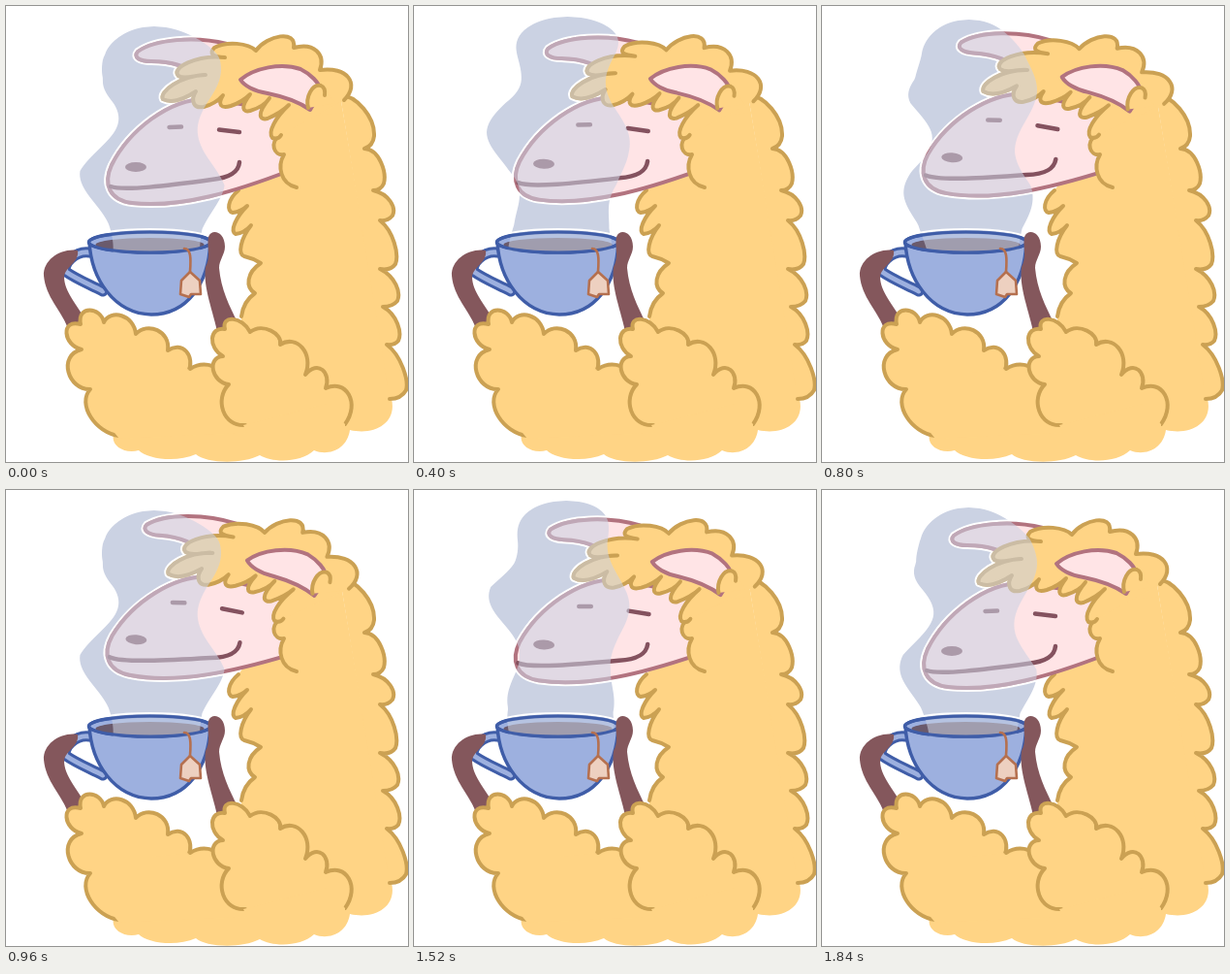
An HTML page that plays this animation: 415 px wide and 470 px high, repeating every 1920 ms.

```html
<!DOCTYPE html>
<html lang="en">
<head>
<meta charset="utf-8">
<title>Alpaca with tea</title>
<style>
  html, body { margin: 0; width: 100%; height: 100%; overflow: hidden; background: #fff; }
  svg { display: block; width: 415px; height: 470px; stroke-linecap: round; stroke-linejoin: round; }
  .wool { fill: #ffd485; stroke: #cba153; stroke-width: 4; }
  .fill { fill: #ffd485; }
  .skin { fill: #ffe4e6; stroke: #b2737f; stroke-width: 4; }
  .dark { stroke: #84525f; stroke-width: 4.5; }
  .paw { fill: #84575c; }
  .china { fill: #9db0df; stroke: #3f5da8; stroke-width: 3.5; }
  .tag { fill: #edd0c0; stroke: #b5704f; stroke-width: 2.6; }
  .halo { fill: #fff; stroke: #fff; stroke-width: 8; }
  .veil { fill: #fff; stroke: #fff; stroke-width: 4; }
  .steam { fill: #cbd2e3; }
  .line { fill: none; }
</style>
</head>
<body>
<svg viewBox="0 0 415 470">
  <defs>
    <path id="farEar" d="M228 39C196 31 154 34 136 47C131 53 138 57 150 57C172 57 186 62 202 74Z"/>
    <path id="face" d="M210 96C168 94 126 130 109 164C100 184 107 200 130 203C180 209 240 190 292 170L300 110Z"/>
    <path id="hair" d="M349 97C366 80 352 62 324 66C330 50 318 37 297 43C300 24 270 30 258 46C250 38 228 36 215 43C209 50 214 52 226 53C196 50 170 64 178 72C186 77 196 70 206 71C180 72 158 88 162 96C172 101 184 96 196 88C190 98 194 106 204 104Q216 101 224 92C218 102 222 106 232 103Q244 99 252 91C242 104 244 110 252 108Q266 104 272 95C258 112 262 118 270 116Q284 110 292 102C278 115 270 130 275 136Q281 138 284 133"/>
    <ellipse id="rim" cx="148.500" cy="243.500" rx="63" ry="10.500"/>
    <path id="handle" d="M86 254C72 252 58 266 62 274C72 281 82 285 100 294"/>
    <path id="right" d="M345 92C362 92 381 115 380 134Q379 144 370 147C386 148 393 172 390 183Q387 190 379 190C396 194 403 208 399 216Q394 222 386 221C400 232 406 256 402 266Q397 273 386 271C402 279 408 295 404 304Q399 310 389 310C404 318 409 337 405 345Q401 350 393 349C408 360 416 386 413 396Q408 405 396 405"/>
    <path id="left" d="M240 190C228 200 228 212 234 213Q243 212 249 206C237 218 231 232 237 235Q246 234 253 226C242 240 239 256 246 258Q255 260 263 265C248 275 247 290 257 296C247 303 244 312 243 320"/>
    <mask id="behind" maskUnits="userSpaceOnUse" x="0" y="0" width="415" height="470">
      <g class="head veil">
        <use href="#farEar"/><use href="#face"/><use href="#hair"/>
      </g>
      <use href="#rim" class="veil"/>
    </mask>
  </defs>

  <path class="steam"/>
  <g class="head halo">
    <use href="#farEar"/><use href="#face"/><use href="#hair"/>
  </g>
  <use href="#rim" class="halo"/>

  <!-- neck and body -->
  <path class="fill" d="M240 190C228 200 228 212 234 213Q243 212 249 206C237 218 231 232 237 235Q246 234 253 226C242 240 239 256 246 258Q255 260 263 265C248 275 247 290 257 296C247 303 244 312 243 320L243 385L100 385L90 420L111 442C108 453 122 462 137 458C146 467 176 471 196 462C206 471 242 473 262 463C275 471 304 471 318 458C332 464 352 458 355 437C380 443 404 430 398 405L345 92L300 95L250 176Z"/>
  <use href="#right" class="wool"/>
  <g class="line"><use href="#left" class="wool" style="fill:none"/></g>

  <g class="head">
    <use href="#farEar" class="skin"/>
    <use href="#face" class="skin"/>
    <path class="dark line" d="M108 186C121 191 168 185 212 179C232 177 240 171 241 161"/>
    <path class="dark line" d="M220 127.500L241 130M168.500 125L181 124.500"/>
    <ellipse cx="134" cy="166" rx="11" ry="5" fill="#84525f"/>
  </g>
  <path class="fill" d="M283 133C272 140 276 155 287 153C280 165 283 183 300 187L345 187L345 110L300 115Z"/>
  <path class="wool" style="fill:none" d="M283 133C272 140 276 155 287 153C280 165 283 183 300 187"/>
  <g class="head">
    <use href="#hair" class="wool"/>
    <path class="skin" d="M314 107C300 97 285 93 270 90C256 88 246 82 242 76C256 64 284 58 304 65C314 70 324 79 325 88Z"/>
    <path class="fill" d="M312 105C309 94 316 83 325 82L340 100Z"/>
    <path class="wool" style="fill:none" d="M312 105C309 94 316 80 325 82Q330 84 329 92"/>
  </g>

  <!-- cup -->
  <g class="line">
    <use href="#handle" stroke="#3f5da8" stroke-width="11"/>
    <use href="#handle" stroke="#9db0df" stroke-width="5"/>
  </g>
  <path class="china" d="M86 243C88 282 112 317 150 318C186 318 209 288 211 243Z"/>
  <use href="#rim" class="china"/>
  <ellipse cx="148.500" cy="246" rx="56" ry="7" fill="#6a5a6c"/>
  <path class="steam" mask="url(#behind)" opacity=".56"/>
  <use href="#rim" class="line" stroke="#3f5da8" stroke-width="3"/>
  <path class="tag line" style="fill:none" d="M184 250C191 250 191 260 190 274"/>
  <path class="tag" d="M190 274L200 283L201 297L191 297L189 300L180 297L181 283Z"/>

  <path class="paw" d="M74 252C58 249 38 261 39 278C41 300 57 314 63 330L82 324C74 308 60 295 60 279C61 269 76 264 74 252Z"/>
  <path class="paw" d="M209 238C212 229 226 232 226 248C226 256 220 262 220 270C222 292 230 308 240 328L219 340C214 314 203 290 206 269C212 258 207 248 209 238Z"/>

  <!-- forearms -->
  <path class="wool" d="M117 443C92 440 73 410 87 395C64 396 53 360 78 354C59 350 56 322 77 328C73 308 98 310 101 326C108 312 132 318 134 338C146 325 170 335 167 355C182 345 196 360 188 378"/>
  <path class="fill" d="M100 425L150 378L190 374Q201 367 216 371L247 400L247 440L117 446Z"/>
  <path class="wool" style="fill:none" d="M190 374Q201 367 213 371"/>
  <path class="wool" d="M247 432C224 434 215 405 230 390C212 388 207 362 224 361C208 352 210 330 226 333C222 318 244 320 252 336C265 326 286 338 283 349C300 338 318 358 309 380C322 364 336 378 330 394C351 384 366 409 350 431"/>
  <path class="fill" d="M245 432L249 440L350 440L350 431L330 410Z"/>
</svg>
<script>
const LOOP = 1920, STEP = 80, TAU = Math.PI * 2, WAVE = 130;
const heads = document.querySelectorAll('.head');
const steams = document.querySelectorAll('.steam');
const tops = [21, 17, 11, 8, 10, 11, 11, 11, 11, 12, 14, 18];

// Edge tables: y, mean x, sway
const leftEdge = [[0, 101, 2], [50, 104, 3], [75, 104, 8], [100, 98, 20], [130, 95, 20],
  [170, 91, 18], [195, 96, 13], [225, 103, 7], [260, 104, 7]];
const rightEdge = [[0, 207, 9], [50, 211, 11], [100, 209, 13], [150, 211, 12], [185, 215, 12],
  [230, 203, 4], [260, 203, 3]];

const ease = u => (1 - Math.cos(Math.PI * u)) / 2;

function edge(table, y, bulge, side) {
  const i = table.findIndex(row => row[0] > y);
  const a = table[i - 1], b = table[i], u = (y - a[0]) / (b[0] - a[0]);
  const mix = k => a[k] + (b[k] - a[k]) * u;
  return mix(1) + side * mix(2) * Math.cos(TAU * (y - bulge) / WAVE);
}

// Bulges climb the column; the top closes in a rounded cap
function steamPath(phase) {
  const top = tops[phase], rise = WAVE * phase / 12, left = [], right = [];
  for (let y = top; y <= 254; y += y < top + 8 ? 1 : 3) {
    const l = edge(leftEdge, y, 183 - rise, -1), r = edge(rightEdge, y, 195 - rise, 1);
    const u = Math.min(1, (y - top) / 36), cap = Math.sqrt(1 - (1 - u) ** 2);
    const mid = (l + r) / 2, half = (r - l) / 2 * cap;
    left.unshift(`${mid - half} ${y}`);
    right.push(`${mid + half} ${y}`);
  }
  return `M${left.concat(right).join('L')}Z`;
}

function draw(now) {
  const frame = Math.floor(now % LOOP / STEP), t = frame * STEP;
  const nod = t < 1200 ? ease(t / 1200) : ease(Math.max(0, 1840 - t) / 640);
  const d = steamPath(frame % 12);
  steams.forEach(s => s.setAttribute('d', d));
  heads.forEach(h => h.setAttribute('transform', `rotate(${4.8 * nod} 290 165)`));
}

const start = performance.now();
function tick() {
  draw(performance.now() - start);
  requestAnimationFrame(tick);
}
tick();
</script>
</body>
</html>
```
